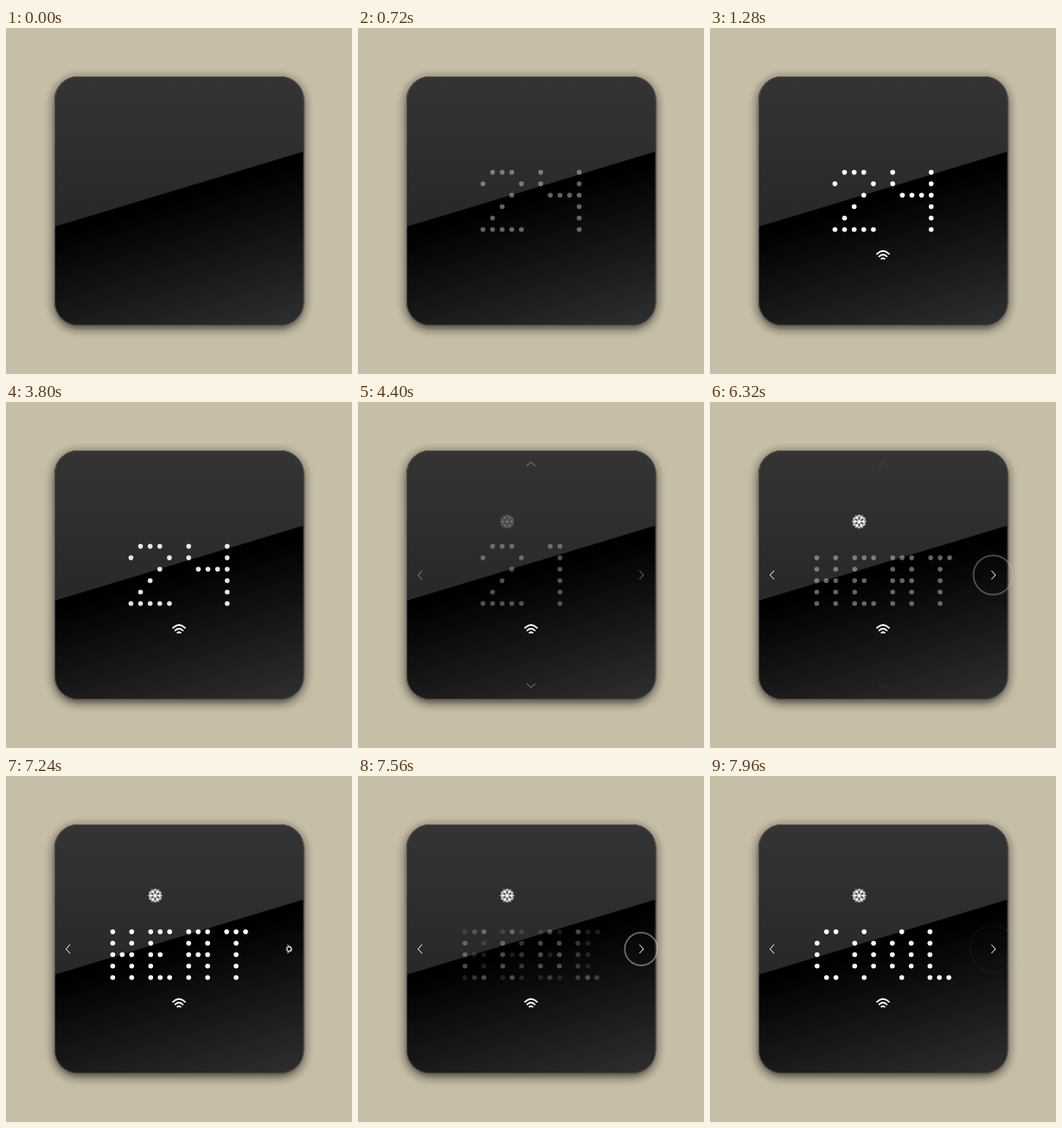
An HTML page for the animation above (8 s loop, 400 by 400 pixels).

```html
<!DOCTYPE html>
<html lang="en">
<head>
<meta charset="utf-8">
<title>Thermostat</title>
<style>
html, body { margin: 0; width: 100%; height: 100%; overflow: hidden; background: #c7bea7; }
svg { display: block; width: 100%; height: 100%; }
.line { fill: none; stroke: #fff; stroke-linecap: round; stroke-linejoin: round; }
.dots { fill: #fff; }
.dots, .line { animation: 8s linear infinite; }
#d24 { animation-name: first; }
#d21 { animation-name: second; }
#heat { animation-name: heat; }
#cool { animation-name: cool; }
#wifi { animation-name: wifi; animation-timing-function: step-end; }
#snow { animation-name: snow; }
#sides { animation-name: sides; }
#ends { animation-name: ends; }
#ring { fill: none; stroke: #c9c2b2; stroke-width: 1.7; animation: grow 8s linear infinite, dim 8s linear infinite; }

@keyframes first { 0%, 5% { opacity: 0 } 15.5%, 47% { opacity: 1 } 52%, 100% { opacity: 0 } }
@keyframes second { 0%, 53% { opacity: 0 } 59.5%, 73.25% { opacity: 1 } 78%, 100% { opacity: 0 } }
@keyframes heat { 0%, 76.5% { opacity: 0 } 83%, 90.5% { opacity: 1 } 95%, 100% { opacity: 0 } }
@keyframes cool { 0%, 93.25% { opacity: 0 } 99.5%, 100% { opacity: 1 } }
@keyframes wifi { 0% { opacity: 0 } 16%, 100% { opacity: 1 } }
@keyframes snow { 0%, 53% { opacity: 0 } 59.5%, 100% { opacity: 1 } }
@keyframes sides { 0%, 53% { opacity: 0 } 57.5%, 100% { opacity: 1 } }
@keyframes ends { 0%, 53% { opacity: 0 } 57.5%, 73% { opacity: 1 } 79.5%, 100% { opacity: 0 } }
/* Quadratic ease-out on each press. */
@keyframes grow {
  0% { r: 0 }
  73%, 90% { r: 0; animation-timing-function: cubic-bezier(.333, .667, .667, 1) }
  83%, 100% { r: 27px }
}
@keyframes dim {
  0%, 72.99% { opacity: 0 }
  73%, 90% { opacity: 1 }
  83%, 89.99%, 100% { opacity: 0 }
}
</style>
</head>
<body>
<svg viewBox="0 0 400 400">
  <defs>
    <linearGradient id="gloss" x1="0" y1="56" x2="0" y2="230" gradientUnits="userSpaceOnUse">
      <stop stop-color="#343434"/><stop offset="1" stop-color="#282828"/>
    </linearGradient>
    <linearGradient id="glass" x1="70" y1="235" x2="120" y2="402" gradientUnits="userSpaceOnUse">
      <stop stop-color="#000"/><stop offset="1" stop-color="#2d2d2d"/>
    </linearGradient>
    <clipPath id="panel"><rect x="56" y="56" width="288.5" height="288" rx="27"/></clipPath>
    <filter id="blur" x="-20%" y="-20%" width="140%" height="140%"><feGaussianBlur stdDeviation="6"/></filter>
  </defs>

  <rect width="400" height="400" fill="#c7bea7"/>
  <rect x="56" y="59" width="288" height="288" rx="27" fill="#1c1a12" opacity=".85" filter="url(#blur)"/>
  <g clip-path="url(#panel)">
    <rect x="56" y="56" width="289" height="289" fill="url(#glass)"/>
    <path d="M56 56H345V142.6L56 229.8Z" fill="url(#gloss)"/>
  </g>
  <rect x="56.5" y="56.5" width="287.5" height="287" rx="26.5" fill="none" stroke="#55554f" stroke-width=".9"/>

  <g id="d24" class="dots"></g>
  <g id="d21" class="dots"></g>
  <g id="heat" class="dots"></g>
  <g id="cool" class="dots"></g>

  <path id="wifi" class="line" stroke-width="1.8" d="M193 261.2Q200 254.4 207 261.2M195.6 264.1Q200 260 204.4 264.1M198.2 266.8Q200 265.4 201.8 266.8"/>
  <g id="snow" class="line" stroke-width="1.4" transform="translate(172.4 138.2)"></g>
  <path id="sides" class="line" d="M73.8 195.2L69.4 200L73.8 204.8M325.6 195.2L330 200L325.6 204.8"/>
  <path id="ends" class="line" d="M195.2 73.8L200 69.4L204.8 73.8M195.2 325.6L200 330L204.8 325.6"/>
  <circle id="ring" cx="327.3" cy="200" r="0"/>
</svg>
<script>
const ROW = 13.23, BASE = 233;
const GLYPHS = {
  2: '.###. #...# ...#. ..#.. .#... #####',
  4: '#...# #...# .#### ....# ....# ....#',
  1: '.##.. ..#.. ..#.. ..#.. ..#.. ..#..',
  H: '#.# #.# ### #.# #.#',
  E: '### #.. ##. #.. ###',
  A: '### #.# ### #.# #.#',
  T: '### .#. .#. .#. .#.',
  C: '.## #.. #.. #.. .##',
  O: '.#. #.# #.# #.# .#.',
  L: '#.. #.. #.. #.. ###'
};

function drawText(id, text, left, advance, pitch) {
  let marks = '';
  [...text].forEach((char, i) => {
    const rows = GLYPHS[char].split(' ');
    rows.forEach((row, y) => [...row].forEach((cell, x) => {
      if (cell !== '#') return;
      const cx = left + i * advance + x * pitch;
      const cy = BASE - (rows.length - 1 - y) * ROW;
      marks += `<circle cx="${cx}" cy="${cy}" r="2.8"/>`;
    }));
  });
  document.getElementById(id).innerHTML = marks;
}

drawText('d24', '24', 144.4, 66.8, 11.13);
drawText('d21', '21', 144.4, 66.8, 11.13);
drawText('heat', 'HEAT', 123.4, 43.9, 10.95);
drawText('cool', 'COOL', 123.8, 43.5, 10.9);

const arm = '<path d="M0 0H7.6M6.6 -2.9L3.9 0L6.6 2.9"';
document.getElementById('snow').innerHTML =
  [0, 60, 120, 180, 240, 300].map(a => `${arm} transform="rotate(${a})"/>`).join('');
</script>
</body>
</html>
```
